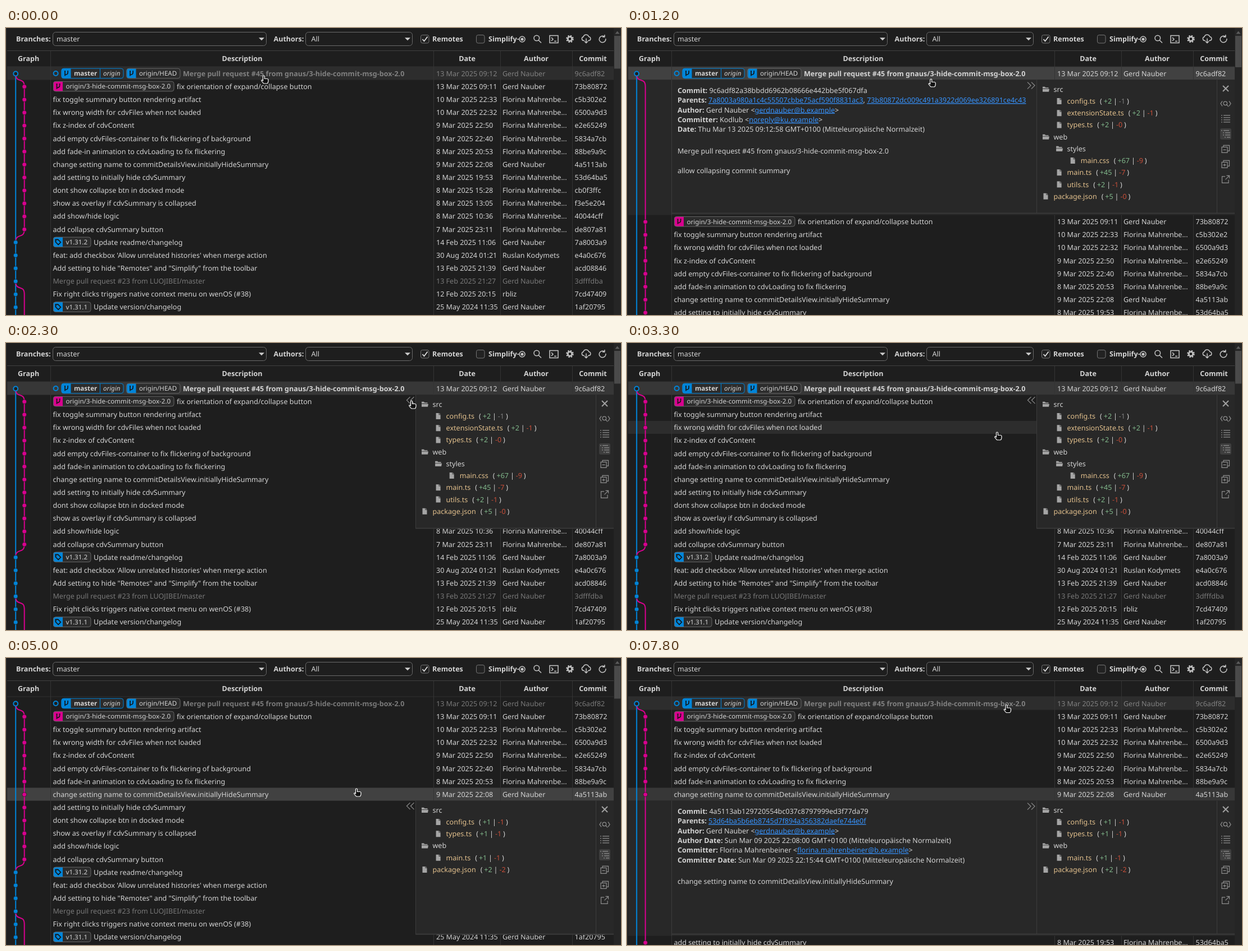
An HTML page that plays this animation: 1095x512 px, repeating every 8000 ms.

```html
<!DOCTYPE html>
<html lang="en">
<head>
<meta charset="utf-8">
<title>Commit graph</title>
<style>
html, body { margin: 0; width: 100%; height: 100%; overflow: hidden; background: #1e1e1e; }
svg { display: block; width: 100%; height: 100%; }
text { font: 12.54px "Noto Sans", sans-serif; fill: #d4d4d4; white-space: pre; text-rendering: geometricPrecision; }
.b { font-weight: 700; }
.i { font-style: italic; }
.mid { text-anchor: middle; }
.ref { font-size: 11.58px; }
.dim { fill-opacity: .5; }
.link { fill: #3794ff; text-decoration: underline; }
.file { fill: #e2c08d; }
.add { fill: #81b88b; }
.del { fill: #c74e39; }
.grey { fill: #7d7d7d; }
.icon { fill: none; stroke: #8e8e8e; stroke-width: 1.2; }
.rule { fill: none; stroke: #3c3c3c; }
.hide { display: none; }
</style>
</head>
<body>
<svg id="stage" viewBox="0 0 1095 512"></svg>
<script>
const BLUE = '#0085d9', PINK = '#d9008f', BG = '#1e1e1e', PANEL = '#282828';
const ROW = 23.15, TOP = 69.4, CDV = 241.15, LOOP = 8000;
const X0 = 17.2, X1 = 32.7;
const stage = document.getElementById('stage');

function el(parent, tag, attrs = {}, text) {
  const node = document.createElementNS('http://www.w3.org/2000/svg', tag);
  for (const k in attrs) node.setAttribute(k, attrs[k]);
  if (text !== undefined) node.textContent = text;
  parent.appendChild(node);
  return node;
}
const group = (p, x = 0, y = 0) => el(p, 'g', { transform: `translate(${x} ${y})` });
const label = (p, x, y, str, cls = '') => el(p, 'text', { x, y, class: cls }, str);
const box = (p, x, y, width, height, fill, more) => el(p, 'rect', { x, y, width, height, fill, ...more });
const line = (p, d, cls = 'rule', more) => el(p, 'path', { d, class: cls, ...more });
const icon = (p, x, y, d, more) => line(group(p, x, y), d, 'icon', more);
const show = (node, on) => node.classList.toggle('hide', !on);

const ROWS = `Merge pull request #45 from gnaus/3-hide-commit-msg-box-2.0|13 Mar 2025 09:12|G|9c6adf82
fix orientation of expand/collapse button|13 Mar 2025 09:11|G|73b80872
fix toggle summary button rendering artifact|10 Mar 2025 22:33|F|c5b302e2
fix wrong width for cdvFiles when not loaded|10 Mar 2025 22:32|F|6500a9d3
fix z-index of cdvContent|9 Mar 2025 22:50|F|e2e65249
add empty cdvFiles-container to fix flickering of background|9 Mar 2025 22:40|F|5834a7cb
add fade-in animation to cdvLoading to fix flickering|8 Mar 2025 20:53|F|88be9a9c
change setting name to commitDetailsView.initiallyHideSummary|9 Mar 2025 22:08|G|4a5113ab
add setting to initially hide cdvSummary|8 Mar 2025 19:53|F|53d64ba5
dont show collapse btn in docked mode|8 Mar 2025 15:28|F|cb0f3ffc
show as overlay if cdvSummary is collapsed|8 Mar 2025 13:05|F|f3e5e204
add show/hide logic|8 Mar 2025 10:36|F|40044cff
add collapse cdvSummary button|7 Mar 2025 23:11|F|de807a81
Update readme/changelog|14 Feb 2025 11:06|G|7a8003a9
feat: add checkbox 'Allow unrelated histories' when merge action|30 Aug 2024 01:21|R|e4a0c676
Add setting to hide "Remotes" and "Simplify" from the toolbar|13 Feb 2025 21:39|G|acd08846
Merge pull request #23 from LUOJIBEI/master|13 Feb 2025 21:27|G|3dfffdba
Fix right clicks triggers native context menu on wenOS (#38)|12 Feb 2025 20:15|rbliz|7cd47409
Update version/changelog|25 May 2024 11:35|G|1af20795`.split('\n').map(r => r.split('|'));
const AUTHORS = { G: 'Gerd Nauber', F: 'Florina Mahrenbe...', R: 'Ruslan Kodymets' };
const INDENT = { 0: 315, 1: 304, 13: 156, 18: 156 };

// *bold* and ~link~
const DETAILS = {
  0: {
    text: ['*Commit:* 9c6adf82a38bbdd6962b08666e442bbe5f067dfa',
      '*Parents:* ~7a8003a980a1c4c55507cbbe75acf590f8831ac3~, ~73b80872dc009c491a3922d069ee326891ce4c43~',
      '*Author:* Gerd Nauber <~gerdnauber@b.example~>',
      '*Committer:* Kodlub <~noreply@ku.example~>',
      '*Date:* Thu Mar 13 2025 09:12:58 GMT+0100 (Mitteleuropäische Normalzeit)'],
    message: ['Merge pull request #45 from gnaus/3-hide-commit-msg-box-2.0', '', 'allow collapsing commit summary'],
    files: ['0 src', '1 config.ts +2 -1 grey', '1 extensionState.ts +2 -1', '1 types.ts +2 -0', '0 web', '1 styles',
      '2 main.css +67 -9', '1 main.ts +45 -7', '1 utils.ts +2 -1', '0 package.json +5 -0']
  },
  3: { text: [], message: [], files: ['0 web', '1 styles', '2 main.css +1 -1'] },
  7: {
    text: ['*Commit:* 4a5113ab129720554bc037c8797999ed3f77da79',
      '*Parents:* ~53d64ba5b6eb8745d7f894a356382daefe744e0f~',
      '*Author:* Gerd Nauber <~gerdnauber@b.example~>',
      '*Author Date:* Sun Mar 09 2025 22:08:00 GMT+0100 (Mitteleuropäische Normalzeit)',
      '*Committer:* Florina Mahrenbeiner <~florina.mahrenbeiner@b.example~>',
      '*Committer Date:* Sun Mar 09 2025 22:15:44 GMT+0100 (Mitteleuropäische Normalzeit)'],
    message: ['change setting name to commitDetailsView.initiallyHideSummary'],
    files: ['0 src', '1 config.ts +1 -1', '1 types.ts +1 -1', '0 web', '1 main.ts +1 -1', '0 package.json +2 -2']
  }
};

function controls() {
  const field = { rx: 5, stroke: '#6a6a6a' };
  const select = (x, w, tx, str) => {
    box(stage, x + .5, 7.5, w, 24, BG, field);
    label(stage, tx, 24, str);
    el(stage, 'path', { d: `M${x + w - 13},17.2h10l-5,5z`, fill: '#ccc' });
  };
  const check = x => box(stage, x, 12.5, 14.5, 14.5, '#222', { rx: 3, stroke: '#757575' });
  label(stage, 18, 24, 'Branches:', 'b');
  select(83, 380, 90, 'master');
  label(stage, 476.5, 24, 'Authors:', 'b');
  select(533, 190, 543.5, 'All');
  check(738.5);
  line(stage, 'M741.5,20l3,3.5l6-8', 'icon', { style: 'stroke:#e4e4e4;stroke-width:1.7' });
  label(stage, 759, 24, 'Remotes', 'b');
  check(837.5);
  label(stage, 859, 24, 'Simplify', 'b');
  const light = { style: 'stroke:#c5c5c5;stroke-width:1.5' };
  icon(stage, 919, 20, 'M-9,0h4M-5,0a5,5 0 1 0 10,0a5,5 0 1 0-10,0', light);
  el(stage, 'circle', { cx: 919, cy: 20, r: 2.6, fill: '#c5c5c5' });
  icon(stage, 946, 19.5, 'M-6,-1.5a4.8,4.8 0 1 0 9.6,0a4.8,4.8 0 1 0-9.6,0M2.2,2.2L7,7', light);
  icon(stage, 975.5, 20, 'M-7.5,-6.5h15v13h-15zM-4.5,-3l3,3l-3,3M.5,3.5h4', light);
  el(stage, 'circle', { cx: 1004, cy: 19.5, r: 3.7, class: 'icon', style: 'stroke:#c5c5c5;stroke-width:2.6' });
  el(stage, 'circle', { cx: 1004, cy: 19.5, r: 5.7, class: 'icon', style: 'stroke:#c5c5c5;stroke-width:2.2;stroke-dasharray:2.5 1.976' });
  icon(stage, 1033, 19.5, 'M-3,3h-1.5a3.4,3.4 0 0 1-.5-6.7a5,5 0 0 1 9.6-.4a3.6,3.6 0 0 1 .4,7.1h-2M0,-1v8M-3,4.2l3,3l3-3', light);
  icon(stage, 1062, 20, 'M3.5,-4.6a5.8,5.8 0 1 0 2.2,3.4M3.8,-8v4h-4', light);

  line(stage, 'M2,40.5H1082', 'rule', { style: 'stroke:#404040' });
  line(stage, 'M2,69H1082', 'rule', { style: 'stroke:#303030' });
  [[40, 'Graph'], [420.5, 'Description'], [821, 'Date'], [944, 'Author'], [1045, 'Commit']]
    .forEach(([x, str]) => label(stage, x, 59, str, 'b mid'));
}

const BRANCH = 'M-2.3,-3.5V4.5M-2.3,2.5C2.6,2.5 2.8,0 2.8,-3M-3.3,-4h2M1.8,-4h2';
const TAG = 'M-4.5,-4.5h4.3l4.8,4.8l-4.3,4.3l-4.8-4.8zM-2.6,-2.3v.6';
function badge(p, x, w, colour, glyph, str, head) {
  const edge = head ? colour : '#666';
  box(p, x + .5, -8.8, w, 17.6, '#2c2c2c', { rx: 4 });
  el(p, 'path', { d: `M${x + 17},-8.8h-13q-4,0-4,4v9.6q0,4 4,4h13z`, fill: colour });
  icon(p, x + 8.8, 0, glyph, { style: 'stroke:#111;stroke-width:1.6' });
  box(p, x + .5, -8.8, w, 17.6, 'none', { rx: 4, stroke: edge });
  label(p, x + 22.5, 4.3, str, head ? 'ref b' : 'ref');
}

const shades = [], rows = [];
function table() {
  const back = group(stage);
  line(stage, 'M79.5,41V512M761.5,41V512M880.5,41V512M1008.5,41V512', 'rule', { style: 'stroke:#343434' });
  ROWS.forEach(([desc, date, who, hash], i) => {
    shades.push(box(back, 2, 0, 1080, ROW, '#808080'));
    const g = group(stage);
    const t = group(g);
    label(t, INDENT[i] || 83.5, 4.8, desc, i ? '' : 'b');
    label(t, 766, 4.8, date);
    label(t, 884, 4.8, AUTHORS[who] || who);
    label(t, 1012.5, 4.8, hash);
    rows.push({ g, t });
  });
  const head = rows[0].g;
  el(head, 'circle', { cx: 88.6, cy: 0, r: 4, fill: 'none', stroke: BLUE, 'stroke-width': 2 });
  badge(head, 98.5, 110, BLUE, BRANCH, 'master', true);
  line(head, 'M167.5,-8.5v17', 'rule', { style: `stroke:${BLUE}` });
  label(head, 173, 4.3, 'origin', 'ref i');
  badge(head, 214.5, 95, BLUE, BRANCH, 'origin/HEAD');
  badge(rows[1].g, 84, 214.5, PINK, BRANCH, 'origin/3-hide-commit-msg-box-2.0');
  badge(rows[13].g, 84, 66.5, BLUE, TAG, 'v1.31.2');
  badge(rows[18].g, 84, 66.5, BLUE, TAG, 'v1.31.1');
}

function richLine(p, y, str) {
  const t = label(p, 90, y, '');
  str.split(/(\*[^*]+\*|~[^~]+~)/).filter(Boolean).forEach(s => {
    const cls = s[0] === '*' ? 'b' : s[0] === '~' ? 'link' : '';
    el(t, 'tspan', { class: cls }, cls ? s.slice(1, -1) : s);
  });
}

function fileLine(p, y, spec) {
  const [depth, name, add, del, tint] = spec.split(' ');
  const x = depth * 24.1;
  const t = label(p, 759.5 + x, y + 4.5, '');
  const span = (str, cls = '', dx = 2.9) => el(t, 'tspan', { class: cls, dx }, str);
  span(name, add ? 'file' : '', 0);
  const fill = { fill: '#a5a5a5' };
  if (!add) {
    el(group(p, 746 + x, y), 'path', { d: 'M-6,-4.5h4l1.3,1.5h5.2v1.6h-10.5zM-6,-.6h12l-1,5.2h-11z', ...fill });
    return;
  }
  el(group(p, 745.5 + x, y), 'path', { d: 'M-4,-5.5h5v3.2h3v7.8h-8zM1.8,-5.5l2.2,2.4h-2.2z', ...fill });
  span('(', '', 8);
  span(add, 'add');
  span('|');
  span(del, tint || 'del');
  span(')');
}

const TOOLS = [
  'M-6,-4.5l-3,4.5l3,4.5M6,-4.5l3,4.5l-3,4.5M-4,-.5a3.3,3.3 0 1 0 6.6,0a3.3,3.3 0 1 0-6.6,0M1.8,1.8l3.2,3.7',
  'M-8,-6h2M-4,-6h12M-8,-2h2M-4,-2h12M-8,2h2M-4,2h12M-8,6h2M-4,6h12',
  'M-8,-6h2M-4,-6h10M-5,-2h2M-1,-2h9M-5,2h2M-1,2h9M-2,6h2M2,6h6',
  'M-7,-3.5h10v10h-10zM-4,-3.5v-3h10.5v10h-3.5M-4.5,1.5h5',
  'M-7,-3.5h10v10h-10zM-4,-3.5v-3h10.5v10h-3.5M-4.5,1.5h5M-2,-1v5',
  'M-1,-5h-5.5v11.5h11.5v-5.5M1.5,-6.5h5v5M6.5,-6.5l-7,7'
];
const panels = {};
function panel(row) {
  const { text, message, files } = DETAILS[row];
  const g = group(stage, 0, TOP + ROW * (row + 1));
  const wide = group(g);
  box(wide, 2, 0, 1080, CDV, PANEL);
  line(wide, `M79.5,0V${CDV}`);
  box(g, 729, 0, 353, 239, PANEL);
  line(g, 'M729.5,0V238M1050.5,0V238');
  line(g, 'M729,238H1082', 'rule', { 'stroke-width': 1.6 });
  icon(g, 1066, 15.4, 'M-5,-5L5,5M5,-5L-5,5', { style: 'stroke:#a0a0a0;stroke-width:2' });

  const loaded = group(g);
  box(loaded, 1056, 86.4, 20, 20, '#3e3e3e', { rx: 3 });
  TOOLS.forEach((d, i) => icon(loaded, 1066, 42.3 + 27 * i, d));
  files.forEach((f, i) => fileLine(loaded, 16.7 + 21.22 * i, f));

  const summary = group(g);
  line(summary, 'M80,238H729', 'rule', { 'stroke-width': 1.6 });
  text.forEach((s, i) => richLine(summary, 23.3 + 17.36 * i, s));
  const msgY = 23.3 + 17.36 * (text.length - 1) + 38.6;
  message.forEach((s, i) => label(summary, 90, msgY + 17.36 * i, s));
  icon(summary, 719.5, 10, 'M-6.5,-6l6,6l-6,6M.5,-6l6,6l-6,6');
  const fold = icon(g, 720, 9.5, 'M6.5,-6l-6,6l6,6M-.5,-6l-6,6l6,6');
  panels[row] = { g, wide, loaded, summary, fold };
}

controls();
table();
Object.keys(DETAILS).forEach(r => panel(+r));

const stroke = c => ({ fill: 'none', stroke: c, 'stroke-width': 2 });
const graph = group(stage, 0, .5);
const trunk = el(graph, 'path', stroke(BLUE));
const side = el(graph, 'path', stroke(PINK));
const dots = ROWS.map((_, i) => {
  const inner = i > 0 && i < 13;
  const look = i ? { fill: inner ? PINK : BLUE, stroke: BG, 'stroke-opacity': .75 } : { ...stroke(BLUE), fill: BG };
  return el(graph, 'circle', { cx: inner ? X1 : X0, r: 3.9, ...look });
});

box(stage, 0, 0, 1, 512, '#2d2d2d');
box(stage, 1082, 0, 13, 512, '#252525');
el(stage, 'path', { d: 'M1084.5,10.5h8l-4-5z', fill: '#5c5c5c' });
const thumb = box(stage, 1083, 14, 11, 58.5, '#4a4a4a');
const hand = el(stage, 'path', {
  d: 'M-3.5,-5.5a1.5,1.5 0 0 1 3,0V-1.5H4a2,2 0 0 1 2,2V3q0,3-2,4H-2q-1.5,-1-4,-4.5q-.8,-1.8 1,-1.6l1.5,1z',
  fill: '#111', stroke: '#fff', 'stroke-width': 1.2
});

const STATES = [
  { at: 0, open: -1 },
  { at: 600, open: 0, wide: true, loading: true },
  { at: 700, open: 0, wide: true },
  { at: 2300, open: 0 },
  { at: 3700, open: 3, loading: true },
  { at: 3900, open: 3 },
  { at: 5000, open: 7 },
  { at: 6200, open: 7, wide: true }
];
// start, 100 ms steps, target x, target y
const MOVES = [[1000, 8, 721, 111], [1900, 1, 724, 110], [3000, 4, 661, 166], [4100, 2, 626, 240],
  [5300, 4, 725, 265], [5900, 1, 728, 266.5], [7100, 8, 677.5, 90.5]];

function pointer(t) {
  let x = 461, y = 92;
  for (const [start, n, tx, ty] of MOVES) {
    if (t < start) break;
    const k = Math.min(1, (Math.floor((t - start) / 100) + 1) / n);
    const e = k * k * (3 - 2 * k);
    x += (tx - x) * e;
    y += (ty - y) * e;
  }
  return [x, y];
}

function hovered(s, x, y) {
  const top = TOP + ROW * (s.open + 1);
  if (s.open >= 0 && y >= top) {
    if (s.wide) return y < top + CDV ? -1 : Math.floor((y - CDV - TOP) / ROW);
    if (x > 729 && y < top + 239 || x > 711 && y < top + 20) return -1;
  }
  return Math.floor((y - TOP) / ROW);
}

let current;
function layout(s) {
  const at = i => TOP + ROW * (i + .5) + (s.wide && i > s.open ? CDV : 0);
  rows.forEach(({ g, t }, i) => {
    g.setAttribute('transform', `translate(0 ${at(i)})`);
    t.setAttribute('class', (i === 0 || i === 16) && i !== s.open ? 'dim' : '');
    shades[i].setAttribute('y', at(i) - ROW / 2);
    dots[i].setAttribute('cy', at(i));
  });
  const b = ROW * .8;
  const bend = (from, to, y) => `C${from},${y + b} ${to},${y + ROW - b} ${to},${y + ROW}`;
  trunk.setAttribute('d', `M${X0},${at(0)}V512`);
  side.setAttribute('d', `M${X0},${at(0)}${bend(X0, X1, at(0))}V${at(12)}${bend(X1, X0, at(12))}` +
    `M${X0},${at(16)}${bend(X0, X1, at(16))}V${at(18) + ROW}`);
  for (const r in panels) {
    const p = panels[r];
    show(p.g, +r === s.open);
    show(p.wide, s.wide);
    show(p.loaded, !s.loading);
    show(p.summary, s.wide && !s.loading);
    show(p.fold, !s.wide && !s.loading);
  }
  thumb.setAttribute('height', s.wide ? 56 : 58.5);
  current = s;
}

function frame(now) {
  const t = now % LOOP;
  const s = STATES.filter(v => v.at <= t).pop();
  if (s !== current) layout(s);
  const [x, y] = pointer(t);
  hand.setAttribute('transform', `translate(${x} ${y})`);
  const over = hovered(s, x - 2, y - 7);
  shades.forEach((r, i) => {
    const open = i === s.open, hot = i === over;
    r.setAttribute('fill-opacity', open ? (hot ? .35 : .25) : hot ? .15 : 0);
  });
  requestAnimationFrame(frame);
}
frame(0);
</script>
</body>
</html>
```
